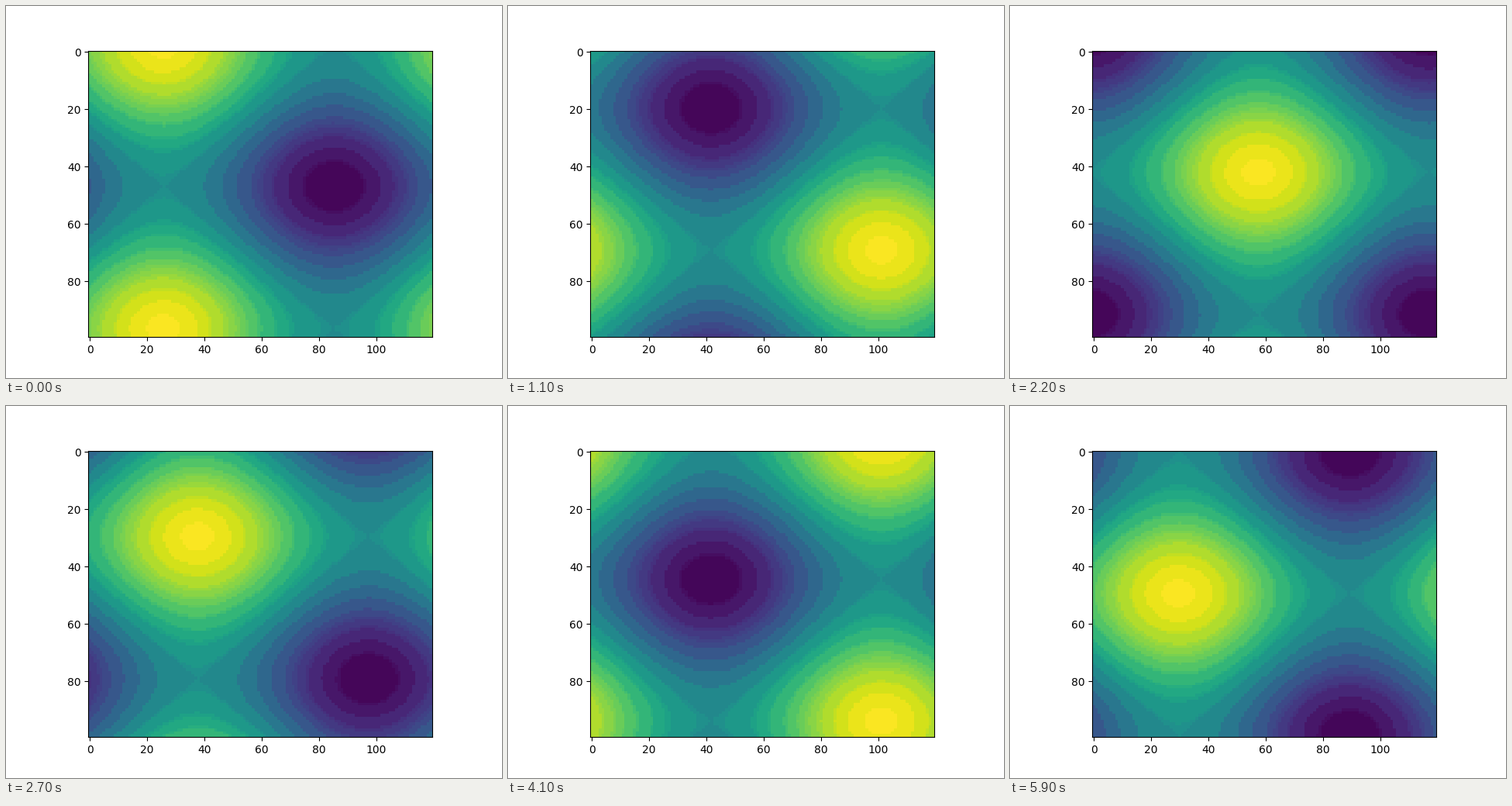
Write a matplotlib script that moves like this. It is 640x480 px and loops after 6 s.

```python
import numpy as np
import matplotlib.pyplot as plt
from matplotlib.animation import FuncAnimation

FRAMES = 60
INTERVAL = 100
CELL = (32, 16, 32)  # size of a colour cell in red, green and blue

viridis = plt.get_cmap("viridis")
x = np.linspace(0, 2 * np.pi, 120)
y = np.linspace(0, 2 * np.pi, 100).reshape(-1, 1)


def wave(frame):
    """Drifting sine and cosine sum, scaled to 0..1."""
    step = frame + 1
    f = np.sin(x + step * np.pi / 15) + np.cos(y + step * np.pi / 20)
    return (f - f.min()) / (f.max() - f.min())


def posterize(rgb):
    """Give all pixels in one colour cell their mean colour."""
    pixels = rgb.reshape(-1, 3).astype(int)
    keys = (pixels // CELL) @ (256, 16, 1)
    _, group = np.unique(keys, return_inverse=True)
    count = np.bincount(group)
    means = [np.bincount(group, channel) // count for channel in pixels.T]
    palette = np.stack(means, axis=1).astype(np.uint8)
    return palette[group].reshape(rgb.shape)


def picture(frame):
    return posterize(viridis(wave(frame), bytes=True)[..., :3])


fig, ax = plt.subplots(figsize=(6.4, 4.8), dpi=100)
image = ax.imshow(picture(0), interpolation="nearest")


def update(frame):
    image.set_data(picture(frame))
    return [image]


anim = FuncAnimation(fig, update, frames=FRAMES, interval=INTERVAL,
                     repeat=True, repeat_delay=0)
plt.show()
```
